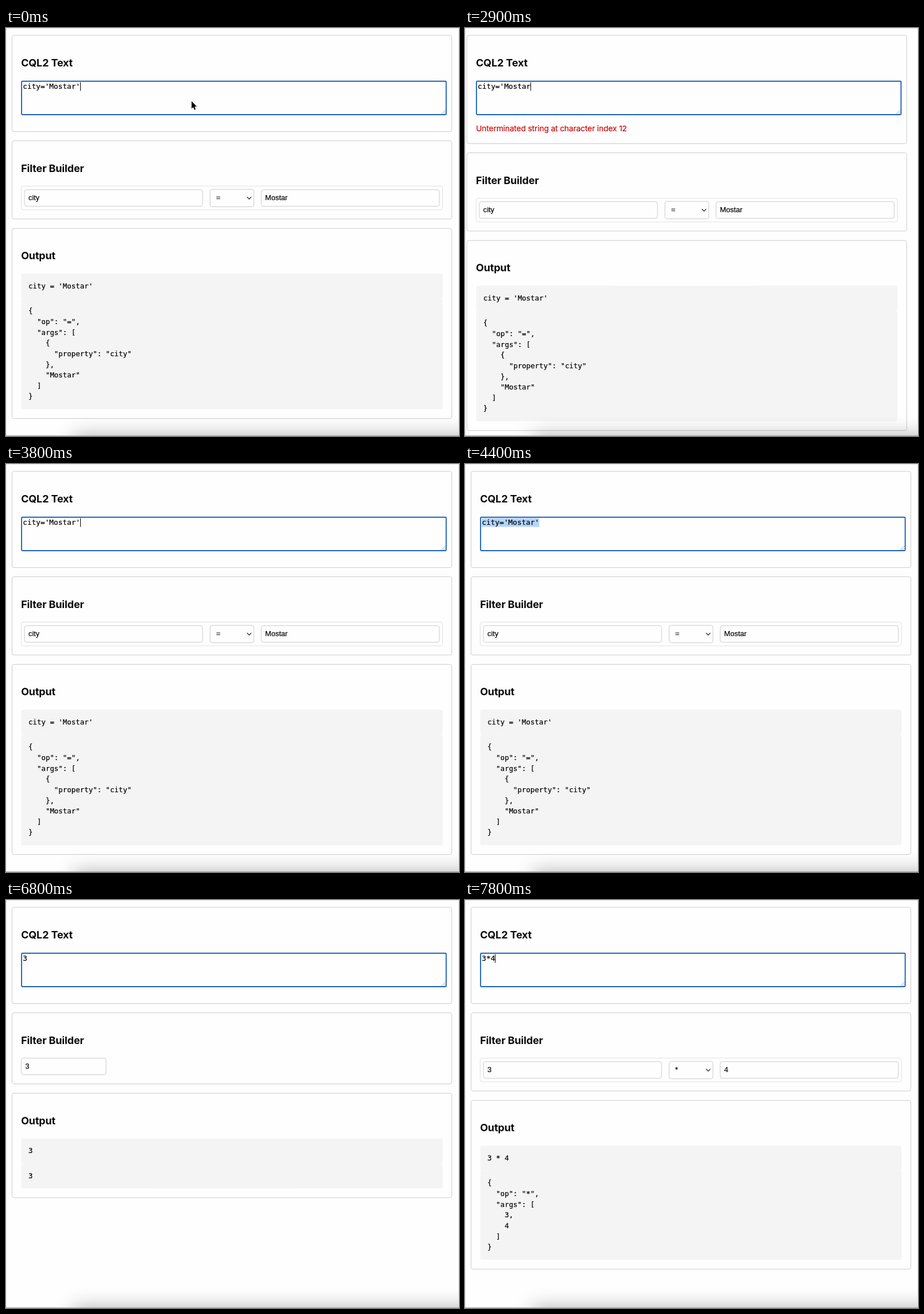
An HTML page for the animation above (8 s loop, 788 by 711 pixels).

```html
<!DOCTYPE html>
<html lang="en">
<head>
<meta charset="utf-8">
<title>CQL2 filter editor</title>
<style>
  html, body { margin: 0; width: 100%; height: 100%; overflow: hidden; background: #fefefe; }
  #stage { position: absolute; left: 0; top: 0; width: 788px; height: 711px; overflow: hidden; }
  svg { position: absolute; left: 0; top: 0; }
  text { white-space: pre; fill: #000; stroke: #000; stroke-width: .2px; }
  .heading { font: 700 17.9px Inter, sans-serif; letter-spacing: -.1px; fill: #0a0a0a; stroke: none; }
  .field { font: 12.75px "Liberation Sans", Arial, sans-serif; }
  .editor { font: 12.75px "DejaVu Sans Mono", monospace; }
  .code { font: 12.43px "DejaVu Sans Mono", monospace; }
  .error { font: 13.7px Inter, sans-serif; letter-spacing: -.1px; fill: #cc0c0c; stroke: #cc0c0c; }
  #shadow { position: absolute; left: 118px; top: 711px; width: 760px; height: 60px;
            box-shadow: 0 0 34px rgba(0, 0, 0, .32); }
  #frame { position: absolute; inset: 0; border: solid #e6e6e6; border-width: 1px 1px 0; }
  #edge { position: absolute; left: 0; right: 0; bottom: 0; height: 1px; background: #a2a2a2; }
</style>
</head>
<body>
<div id="stage">
  <svg width="788" height="711">
    <g id="page"></g>
    <path id="pointer" d="M0 0V13L2.9 10.3L4.9 15L7.1 14.1L5.2 9.4H9.1Z"
          stroke="#fff" stroke-width="1.6" paint-order="stroke" stroke-linejoin="round"/>
  </svg>
  <div id="shadow"></div>
  <div id="frame"></div>
  <div id="edge"></div>
</div>
<script>
const LOOP = 8000;
const LINE = 18.64, PAD = 12.4, EDITOR_CHAR = 7.68;
const ERROR_HEIGHT = 21, SCROLLBAR_SHIFT = -7.2;

const page = document.getElementById('page');
const pointer = document.getElementById('pointer');

const toJson = value => JSON.stringify(value, null, 2);
const operation = (left, op, right, text, args) =>
  ({ fields: [left, op, right], text, json: toJson({ op, args }) });
const literal = (value, json) => ({ fields: [value], text: value, json });

const city = operation('city', '=', 'Mostar', "city = 'Mostar'", [{ property: 'city' }, 'Mostar']);
const empty = literal('', '""');
const three = literal('3', '3');
const product = operation('3', '*', '4', '3 * 4', [3, 4]);

const steps = [
  { at: 0, input: "city='Mostar'", filter: city },
  { at: 2900, input: "city='Mostar", filter: city, shift: SCROLLBAR_SHIFT,
    error: 'Unterminated string at character index 12' },
  { at: 3800, input: "city='Mostar'", filter: city },
  { at: 4400, input: "city='Mostar'", filter: city, selected: true },
  { at: 5100, input: '', filter: empty },
  { at: 6300, input: '3', filter: three },
  { at: 7200, input: '3*', filter: three, error: 'Expect expression at character index 2' },
  { at: 7700, input: '3*4', filter: product },
];

const caretTimes = [[0, 900], [1400, 1900], [2500, 3000], [3500, 4300],
                    [5100, 5600], [6100, 6800], [7200, LOOP]];

const escapeText = s => s.replace(/&/g, '&amp;').replace(/</g, '&lt;');
const label = (kind, x, y, s) => `<text class="${kind}" x="${x}" y="${y}">${escapeText(s)}</text>`;
const fill = (x, y, w, h, color, r = 0) =>
  `<rect x="${x}" y="${y}" width="${w}" height="${h}" rx="${r}" fill="${color}"/>`;
const outline = (x, y, right, bottom, color = '#ccc', width = 1, r = 3.5) =>
  `<rect x="${x}" y="${y}" width="${right - x}" height="${bottom - y}" rx="${r}"
    fill="none" stroke="${color}" stroke-width="${width}"/>`;
const panel = (top, bottom, title) =>
  outline(10.5, top, 775.5, bottom) + label('heading', 26.2, top + 54, title);

function editor({ input, error, selected }, caret) {
  const end = 29.3 + input.length * EDITOR_CHAR;
  return panel(12.8, 180.5 + (error ? ERROR_HEIGHT : 0), 'CQL2 Text')
    + outline(27.1, 92.7, 765.7, 151, '#1c62b9', 1.9, 1.5)
    + '<path d="M757.5 150L764.5 143M761.5 150L764.5 147" stroke="#888" stroke-width=".8"/>'
    + (selected ? fill(29.3, 94.5, end - 29.3, 15, '#b4d5fe') : '')
    + label('editor', 29.3, 106.3, input)
    + (caret ? fill(Math.round(end - .4), 94.5, 1, 15, '#000') : '')
    + (error ? label('error', 19.2 - SCROLLBAR_SHIFT, 179.8, error) : '');
}

function builder(fields, top) {
  if (fields.length === 1) {
    return panel(top, top + 124, 'Filter Builder')
      + outline(26.5, top + 79, 174, top + 108)
      + label('field', 33.5, top + 97.5, fields[0]);
  }
  const [left, op, right] = fields;
  const base = top + 103.6;
  return panel(top, top + 136.4, 'Filter Builder')
    + outline(26.5, top + 79, 759.5, top + 120.4, '#e2e2e2')
    + outline(32.2, top + 85.2, 342, top + 114.2)
    + outline(355, top + 84.7, 431.2, top + 115)
    + outline(444, top + 85.2, 753.8, top + 114.2)
    + label('field', 39, base, left) + label('field', 365.6, base, op) + label('field', 450.8, base, right)
    + `<path d="M419.3 ${top + 97.9}l3.7 3.7l3.7-3.7" fill="none" stroke="#111" stroke-width="1.2"/>`;
}

function codeBlock(top, lines) {
  const height = lines.length * LINE + 2 * PAD;
  const svg = fill(26.5, top, 733, height, '#f4f4f4', 3.5)
    + lines.map((s, i) => label('code', 39, top + PAD + 13.2 + i * LINE, s)).join('');
  return { svg, bottom: top + height };
}

function output({ text, json }, top) {
  const query = codeBlock(top + 79, text ? [text] : []);
  const tree = codeBlock(query.bottom, json.split('\n'));
  return panel(top, tree.bottom + 16.2, 'Output') + query.svg + tree.svg;
}

function render(step, caret) {
  const builderTop = 196.5 + (step.error ? ERROR_HEIGHT : 0);
  const outputTop = builderTop + (step.filter.fields.length === 1 ? 140.3 : 152.8);
  page.setAttribute('transform', `translate(${step.shift || 0} 0)`);
  page.innerHTML = editor(step, caret) + builder(step.filter.fields, builderTop)
    + output(step.filter, outputTop);
}

let shown = '';
function draw(now) {
  const t = now % LOOP;
  const index = steps.findLastIndex(s => s.at <= t);
  const caret = caretTimes.some(([on, off]) => t >= on && t < off);
  const key = index + '/' + caret;
  if (key !== shown) {
    render(steps[index], caret);
    shown = key;
  }
  const moved = Math.min(4, Math.max(0, Math.floor((t - 800) / 100))) / 4;
  pointer.setAttribute('transform', `translate(${322.8 - 2.3 * moved} ${127.6 - 10.3 * moved})`);
  pointer.style.display = t < steps[1].at ? '' : 'none';
}

const start = performance.now();
function tick() {
  draw(performance.now() - start);
  requestAnimationFrame(tick);
}
tick();
</script>
</body>
</html>
```
